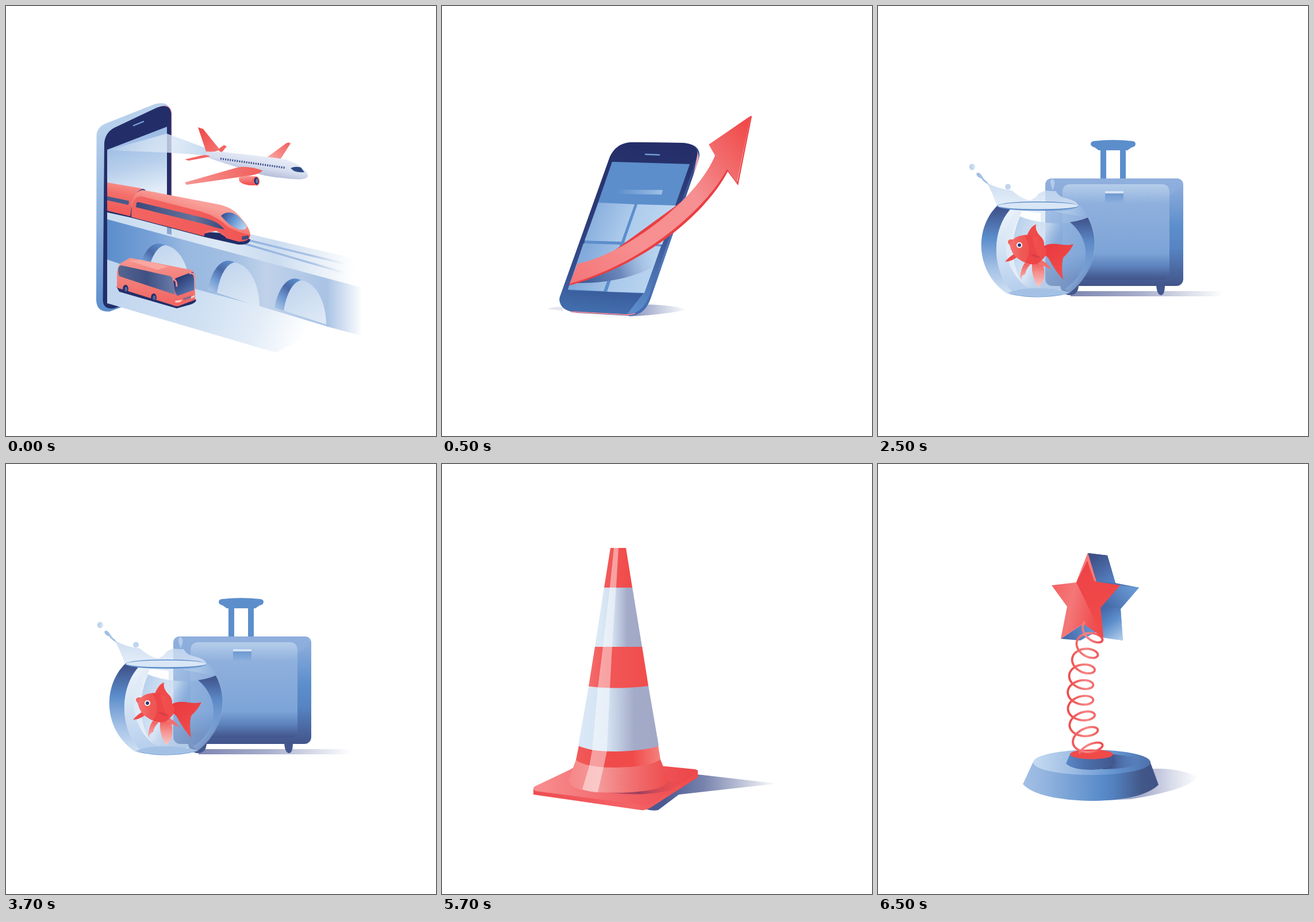
Write an HTML page that moves like this. It is 748 px wide and 748 px high and loops after 8000 ms.

```html
<!DOCTYPE html>
<html lang="en">
<head>
<meta charset="utf-8">
<title>Illustrations</title>
<style>
html, body { margin: 0; width: 100%; height: 100%; overflow: hidden; background: #fff; }
svg { display: block; width: 100%; height: 100%; }
</style>
</head>
<body>
<svg id="stage" viewBox="0 0 748 748" xmlns="http://www.w3.org/2000/svg"></svg>
<script>
const NAVY = '#232e69', BLUE = '#5c8ecc', DEEP = '#42548a', RED = '#f04a49', CORAL = '#f26462', PINK = '#f78f8f';
const defs = [];

// Linear gradient in stage units; a stop is "colour" or "colour offset".
function lin(x1, y1, x2, y2, ...stops) {
  const id = 'g' + defs.length;
  const body = stops.map((s, i) => {
    const [c, o = i / (stops.length - 1)] = s.split(' ');
    return `<stop offset="${o}" stop-color="${c}"/>`;
  }).join('');
  defs.push(`<linearGradient id="${id}" gradientUnits="userSpaceOnUse" x1="${x1}" y1="${y1}" x2="${x2}" y2="${y2}">${body}</linearGradient>`);
  return `url(#${id})`;
}
const path = (d, fill, more = '') => `<path d="${d}" fill="${fill}" ${more}/>`;
const line = (d, stroke, w, more = '') => path(d, 'none', `stroke="${stroke}" stroke-width="${w}" ${more}`);
const oval = (x, y, rx, ry, fill, more = '') => `<ellipse cx="${x}" cy="${y}" rx="${rx}" ry="${ry}" fill="${fill}" ${more}/>`;
const box = (x, y, w, h, r, fill) => `<rect x="${x}" y="${y}" width="${w}" height="${h}" rx="${r}" fill="${fill}"/>`;
const turn = (a, x, y) => `transform="rotate(${a} ${x} ${y})"`;

function travel() {
  const arch = (x, y) => `<g transform="translate(${x} ${y})">` +
    path('M351 494C357 462 371 443 387 443Q396 444 403 449L369 500Z', lin(353, 494, 392, 446, '#a8c3e6', '#6f98d0 .35', '#4a69a8 .65', '#5c8ecc')) +
    path('M367 499C371 475 380 450 397 446C424 449 441 486 441 523Z', lin(385, 450, 425, 520, '#c2d6ee', '#dde8f5')) + '</g>';
  const phone =
    path('M157 512L157.500 224Q159 209 177 203L258 171Q284 163 288 186V400L206 522L180 531.500Q158 533 157 512Z', lin(160, 210, 170, 530, '#b7d0ec', '#8cb2df', BLUE)) +
    path('M270 173Q288.500 171 288.500 188V330H286V186Z', '#f3a9b5') +
    path('M168.500 513L171 238Q173 220 188 212L262 177Q285 168 287.500 187V400L207 520L187 526Q170 528 168.500 513Z', NAVY) +
    path('M176 250L280 210V400L176 518Z', lin(215, 232, 240, 325, '#9dbce4', '#b9d0ec', '#e1ecf8')) +
    line('M222 208L239 201', '#7ba4da', 2.4, 'stroke-linecap="round"') +
    path('M176 251L280 222L350 248L351 260L280 255Z', lin(176, 250, 350, 250, '#ffffff10', '#dfeaf6b8 .5', '#c7dbf1'));
  const dots = line('M373 265.500L486 281.500', '#3b4b87', 3.4, 'stroke-dasharray="2 2.1"');
  const plane =
    path('M453 264L487 239Q492 236 495 239L477 267Z', lin(460, 265, 492, 238, '#f9a39f', CORAL)) +
    path('M368 250L379 242L384 244L375 255Z', CORAL) +
    path('M347 257Q350 252 368 253L397 256L467 264Q496 267 510 278Q527 290 525 297Q520 304 488 300Q447 297 413 284L357 266Q349 263 347 257Z', lin(432, 258, 424, 298, '#e6ebf6', '#d5dcee .45', '#a3adcd')) +
    dots +
    path('M495 282Q504 278 513 281L519 289Q508 290 501 287Z', '#2d4a84') +
    path('M334 211L343 214L372 250Q363 255 348 253Z', lin(335, 215, 363, 252, RED, '#f4706c')) +
    path('M311 267L340 260Q350 258 355 262L318 269Z', CORAL) +
    path('M311 307L402 281Q419 277 446 286Q443 292 424 295L314 311Z', lin(311, 308, 442, 285, '#f69793', '#f25e5b')) +
    path('M405 299Q413 293 438 297Q444 307 435 312Q413 313 406 305Z', lin(420, 295, 421, 312, '#f99a96', RED)) +
    oval(435, 304.5, 6, 8, CORAL, turn(-8, 435, 304)) + oval(435.5, 304.5, 4, 6.3, NAVY, turn(-8, 436, 304)) + oval(436.5, 304.5, 2.2, 4, '#617aac');
  const bridge =
    path('M176 370L620 490V574L560 558L176 449Z', lin(176, 0, 620, 0, '#5c8ecc', '#78a1d7 .18', '#97b8e0 .3', '#a4c0e3 .5', '#c0d2ea .62', '#a9c3e5 .86', '#fff')) +
    arch(-121, -30) + arch(0, 0) + arch(116, 31) +
    path('M176 355L425 397L604 439L620 490L176 371Z', lin(176, 0, 606, 0, '#c7dbf0', '#dce8f5 .45', '#cbdcf0 .68', '#fff')) +
    path('M280 384H288V398L280 396Z', '#87a5d0') +
    line('M420 407L592 449M410 412L588 464', lin(410, 0, 594, 0, '#8eafdb', '#a9c3e5 .65', '#fff'), 3.5);
  const train =
    path('M176 354L221 363L350 393L402 397L425 406Q424 416 404 415L346 402L217 368L176 359Z', NAVY) +
    path('M176 307L229 316Q239 317 239 321Q225 323 219 342L217 366L176 356Z', lin(205, 308, 195, 358, '#f8908a', '#f36e6a .4', '#f15b59')) +
    path('M176 331L214 339L213 346L176 338Z', '#485a8c') +
    path('M216 367L219 346Q222 323 238 318L243 320Q226 330 224 349L220 369Z', NAVY) +
    path('M218 367L219 346Q221 322 238 320L369 345Q395 350 409 369Q425 387 425 399Q424 409 407 409L385 404L366 391L345 396V400Z', lin(300, 332, 285, 382, '#f9a09a', '#f57d77 .5', CORAL)) +
    path('M218 367L220 346Q223 331 235 331L341 358Q368 366 387 385Q407 395 424 398Q425 410 405 410L383 404Q376 390 356 390Q345 389 343 400Z', lin(220, 350, 420, 402, '#f26562', '#f15654')) +
    path('M227 342L230 341L346 369Q370 375 380 389Q362 385 344 379L226 350Z', lin(226, 0, 380, 0, '#39497f', '#667399 .65', '#39497f')) +
    path('M374 365Q382 357 394 360Q407 365 418 382Q421 390 406 389Q388 383 374 365Z', lin(377, 363, 415, 388, '#35539a', '#6d9cd7 .5', '#bdd5f0')) +
    path('M410 401L422 399V405L411 407Z', '#414d83');
  const road = path('M176 441L320 490L441 522L557 557L470 603L176 517Z', lin(190, 460, 515, 588, '#c0d5ee', '#cedff2 .45', '#e2ecf7 .75', '#fff'));
  const wheel = (x, y) => oval(x, y, 4.8, 7, NAVY) + oval(x + .8, y + .5, 2.3, 4, '#56699b');
  const bus =
    path('M192 488L297 518L330 510Q333 515 322 519L297 526L197 497Z', NAVY) +
    path('M193 490V463Q195 450 200 447L216 438L317 458Q327 460 328 467L329 511L300 522Q295 523 289 520Z', lin(225, 440, 225, 520, '#f7958e', '#f27a75 .55', '#f16461')) +
    path('M213 443L233 441L283 453L264 459Z', '#f9a7a0') +
    path('M196 454L200 451L286 470Q290 472 290 478L294 502L197 470Q194 463 196 454Z', lin(196, 0, 294, 0, '#53658f', '#3f5083 .5', '#6a7dab')) +
    path('M291 478Q293 474 299 472L323 463Q327 462 327 468V494L299 504Q293 502 291 478Z', lin(300, 474, 320, 500, '#2c3c75', '#5876af')) +
    path('M294 513L307 511L303 515L295 516ZM320 507L328 503V506L322 509Z', '#ffd3c8') +
    path('M308 508L322 504V508L309 512Z', '#8a6b8c') +
    line('M292 476Q297 477 297 487M320 465Q328 464 328 473', PINK, 2.8, 'stroke-linecap="round"') +
    wheel(208, 492) + wheel(257, 507);
  return phone + plane + bridge + train + road + bus;
}

function growth() {
  const tile = (d, y) => path(d, lin(255, y, 385, y + 50, '#82aadb', '#a9c8ea .5', '#bad5f0'));
  return path('M184 527Q196 522 210 524V530Z', '#e3e5f0') +
    path('M345 519Q393 519 428 528Q385 537 325 540Z', lin(335, 0, 428, 0, '#8d97c0', '#c9cee2 .5', '#ffffff')) +
    path('M297 260Q308 238 334 237L419 238Q455 241 446 269L364 506Q354 538 327 539L236 534Q199 529 206 505Z', lin(400, 260, 290, 530, '#354a8b', '#5079ba .55', '#436aae')) +
    path('M437 246Q449 254 446 269L437 296L443 264Z', '#e7a4b4') +
    line('M225 532L322 537Q330 537 336 534', '#f08792', 2) +
    path('M292 262Q304 237 331 237L417 238Q450 240 443 264L361 502Q350 535 322 536L233 531Q197 524 206 503Z', lin(330, 240, 300, 535, '#252e68', '#2b3b78 .45', '#35508f .78', '#426ead')) +
    path('M443 264L361 502Q350 535 322 536L350 500L431 275Z', lin(430, 280, 340, 530, '#2b397566', '#5b8ccc')) +
    path('M296 271L431 275L352 500L219 494Z', BLUE) +
    line('M354 258L378 259', '#6e9bd5', 2.5, 'stroke-linecap="round"') +
    path('M306 319.500L384 320L382 328L303 327Z', lin(303, 0, 384, 0, '#5c8ecc', '#9fc0e7')) +
    tile('M272 342L335 345L312 410L248 408Z', 342) +
    tile('M340 345L407 347L383 415L317 411Z', 320) +
    tile('M246 413L310 415L281 496L219 493Z', 413) +
    tile('M315 415L381 418L352 499L287 497Z', 390) +
    path('M232 482Q305 457 371 421L367 454Q312 483 232 482Z', lin(242, 480, 372, 430, '#3d5794', '#6b88bc .5', '#afcae900')) +
    path('M221 486L223 481L497 282L514 306L537 191L539 192L515 312L497 288C455 368 342 455 221 486Z', '#e93f43') +
    path('M236 448C320 432 445 335 475 260L464 241L537 191L513 308L496 284C452 363 340 451 222 483Z', lin(225, 470, 535, 210, '#f4777a', '#f78f90 .3', '#f69092 .63', '#f26b6c .82', RED));
}

function escape() {
  const shell = lin(0, 300, 0, 487, '#94b2de', '#5c8ecc .45', '#5784c3 .65', DEEP);
  const fin = lin(0, 440, 0, 490, RED, '#f5928f', '#f9c9ca');
  const luggage =
    box(335, 496, 266, 9, 0, lin(335, 0, 601, 0, '#7d86b0', '#a7aecb .45', '#fff')) +
    box(387, 248, 10, 56, 0, BLUE) + box(421, 248, 10, 56, 0, BLUE) +
    path('M375 235Q409 231 443 235Q448 236 448 240Q448 245 441 246L434 251H384L377 246Q370 244 370 240Q370 236 375 235Z', BLUE) +
    path('M317 485H349Q349 503 332 503Q317 500 317 485ZM484 485H499Q499 503 492 503Q485 502 484 485Z', '#43578f') +
    box(291, 300, 240, 187, 12, shell) +
    path('M303 300H519Q531 300 531 312L507 330V320Q506 310 494 310H335Q321 311 321 324V476L291 475V312Q291 300 303 300Z', lin(0, 300, 0, 476, '#8fafdd', '#7ba2d700')) +
    path('M335 310H493Q507 310 507 324V462Q507 476 493 476H335Q321 476 321 462V324Q321 310 335 310Z', lin(0, 310, 0, 476, '#b5cdea', '#8fb0dd .2', '#7da4d7 .72', '#5d82bd .86', DEEP)) +
    box(395, 322, 32, 20, 0, lin(0, 326, 0, 342, '#7099d1', '#8bafdd')) + box(395, 322, 32, 4, 0, '#d6e5f5');
  const splash = lin(0, 305, 0, 348, '#c0d4edd0', '#dce8f6c0');
  const bowl =
    path('M190 308Q210 318 233 321Q249 335 263 338Q273 336 279 327Q290 319 300 322H309Q315 333 329 335Q344 338 350 348H207Q199 325 190 308Z', splash) +
    path('M171 292Q174 287 179 293L185 302Q190 305 193 311Q182 305 180 300Q172 298 171 292Z', '#a2bfe4') +
    oval(164, 280, 5, 5.5, lin(159, 0, 169, 0, '#b3cbea', '#dce7f5')) + oval(226, 314.5, 5, 5, '#c0d5ee') +
    path('M300 309Q299 300 304 301Q309 304 307 311L304 321Z', '#bfd3ecc0') +
    path('M208 347C169 384 167 460 224 500Q278 513 332 500C391 456 389 381 350 347Z', lin(180, 0, 378, 0, '#cbddf1', '#e4edf8 .3', '#c7daf080 .56', '#8fb1de50')) +
    path('M208 347C169 384 167 460 224 500L236 500C196 461 198 390 230 354Z', lin(0, 350, 0, 500, '#3e5088', '#5c8ecc .36', '#a3c0e5 .7', '#cfe0f3')) +
    path('M230 354C198 390 196 461 236 500L263 492C215 458 211 397 241 355Z', lin(210, 370, 240, 490, '#e8f0f9', '#b8d0ed')) +
    path('M230 354H251L246 367C225 405 238 470 268 492H283V360Z', lin(0, 355, 0, 490, '#ffffff', '#f2f6fc80')) +
    path('M247 366Q279 379 323 378Q350 377 365 369C389 413 368 465 331 493H260C228 458 230 402 247 366Z', lin(240, 380, 375, 440, '#a9c6e8d0', '#cfe0f2b0 .35', '#82a8d970 .52', '#79a1d680')) +
    path('M334 376Q350 374 365 368C390 416 372 468 333 499L324 493C373 460 371 407 334 376Z', lin(0, 368, 0, 495, '#3e5088', '#5b87c4 .32', '#6f9ad1c0 .6', '#8fb2de80')) +
    path('M306 357Q339 358 350 347Q360 355 365 368Q338 364 306 357Z', lin(306, 0, 365, 0, '#c9dcf080', '#8cafdd')) +
    oval(278, 348, 71, 8, '#5d8ecc') + oval(278.5, 347.5, 70, 6, '#d9e6f5') +
    path('M224 500Q278 513 332 500Q278 508 224 500Z', BLUE) +
    path('M226 499Q242 491 279 491Q321 492 333 499Q310 505 279 506Q243 505 226 499Z', '#a4c1e5');
  const fish =
    path('M265 450Q257 458 256 466Q250 468 248 476Q246 462 255 447Z', fin) +
    path('M268 449Q266 468 278 489Q291 481 289 458L285 444Z', fin) +
    path('M277 440Q294 444 302 459Q292 452 280 451Z', '#f36e6d') +
    path('M245 434Q233 445 221 445Q228 436 239 430Z', RED) +
    path('M258 402Q265 383 275 380Q272 390 283 401Q290 407 289 418L265 412Z', RED) +
    path('M286 419Q298 411 318 415Q333 417 340 414Q335 426 322 438Q318 453 322 476Q310 463 299 443Q294 433 284 431Z', lin(288, 418, 325, 460, '#e8393f', RED)) +
    path('M229 406Q225 411 229 416Q233 434 246 441Q267 456 285 442Q298 430 290 418Q280 400 262 398Q243 398 235 406Z', lin(230, 422, 290, 420, '#f57472', '#ef5855 .35', RED)) +
    path('M254 399Q270 420 256 447Q275 454 285 442Q269 423 269 398Z', '#ee4548') +
    path('M264 431Q275 431 283 438Q270 439 264 431Z', '#d93d49') +
    path('M226 409Q228 405 234 407L231 415Q225 414 226 409Z', '#f36563') +
    oval(246, 416, 5, 5, '#fff') + oval(246, 416, 3, 3, '#2d3972');
  return luggage + bowl + fish;
}

function cone() {
  const red = lin(255, 0, 378, 0, '#f46d6b', '#f25758 .25', RED);
  const grey = lin(248, 0, 368, 0, '#d9e8f6', '#d2e0f0 .35', '#a3abc8 .72', '#a2a9c7');
  return path('M445 540L583 556L412 575L376 602Q368 604 356 601L400 550Z', lin(385, 0, 583, 0, '#4b5991', '#7782ad .35', '#fff')) +
    path('M159 564V575L346 602Q355 603 364 597L445 545V535L352 592Z', lin(160, 0, 445, 0, '#ef4c50', '#f36367 .6', RED)) +
    path('M161 561L222 532Q228 527 245 525H380L440 531Q449 533 443 538L365 590Q358 594 349 593L163 569Q156 566 161 561Z', lin(175, 560, 430, 540, '#f78b8c', '#f26064 .58', '#ed484c')) +
    path('M246 564Q310 573 390 552L421 552L396 568Q330 583 246 564Z', lin(250, 0, 420, 0, '#af405b00', '#9c405d .55', '#e9464c00')) +
    path('M233 515L220 550Q221 566 268 571Q335 574 373 565Q394 558 393 548L380 514Z', lin(221, 0, 393, 0, '#f68787', '#f49b9a .3', '#f17475 .6', '#ee4d4e')) +
    path('M238 490L233 515Q252 529 306 528Q364 526 380 514L376 490Z', lin(235, 0, 380, 0, '#f15a5a', '#ef4c4c .3', RED, '#f4827f')) +
    path('M255 388L237 490Q260 501 306 500Q358 498 377 490L359 386Z', grey) +
    path('M266 318L255 387Q305 393 359 386L348 317Z', red) +
    path('M282 214L266 318H348L331 214Z', lin(276, 0, 340, 0, '#dbe9f6', '#d0dded .35', '#a3abc8 .72', '#a2a9c7')) +
    path('M293 146L282 215H331L320 146Z', lin(285, 0, 327, 0, '#f25a59', RED)) +
    path('M299 146H307L303 214L296 318L292 390L287 499L281 528L271 571Q256 570 244 566L256 526L261 499L271 390L280 318L292 214Z', '#ffffff', 'opacity=".45"');
}

function spring() {
  let d = '';
  // A trochoid along a bent spine; u counts the turns.
  for (let u = -.58; u <= 7.42; u += .02) {
    const a = u * 2 * Math.PI, r = 20 + u * .55;
    const dx = r * Math.cos(a);
    const x = 352 + 1.35 * (u - 3.7) ** 2 + dx;
    const y = 305 + 26.4 * u - 13.7 * Math.sin(a) + (.2 - .055 * u) * (dx - r);
    d += (d ? 'L' : 'M') + x.toFixed(1) + ' ' + y.toFixed(1);
  }
  return line(d, lin(332, 0, 388, 0, '#ee4d4d', '#f3696a .3', '#f68788 .55', '#ef4e50'), 3.8, 'stroke-linejoin="round"');
}

function trophy() {
  const base =
    path('M465 531Q520 526 557 545Q535 568 440 583L375 586Z', lin(455, 0, 557, 0, '#a3aacb', '#d9dcea .55', '#fff')) +
    path('M270 518L252 557Q278 584 372 586Q460 585 488 558L473 517Z', lin(253, 0, 488, 0, '#a2c0e5', '#94b5df .15', '#5c8ecc .55', '#5380bf .67', '#425788 .88', '#3f5287')) +
    oval(372, 519, 102, 22, lin(270, 510, 474, 525, '#c6dbf1', '#a0bfe5 .32', '#6596d1 .68', '#4c70ad')) +
    path('M409 505Q450 508 454 519Q446 530 390 531Z', lin(405, 0, 455, 0, '#3f548b', '#4c70ad00')) +
    path('M334 505L327 521Q338 532 371 532Q403 531 413 521L409 505Z', lin(327, 0, 413, 0, '#5b89c7', '#4d71ae .35', '#41568c')) +
    oval(371.5, 505, 37.5, 8.5, RED);
  const star =
    path('M365 155L399 159L413 207L454 215L422 252L426 307L391 302L380 250Z', lin(405, 165, 420, 305, '#3e5188', '#4d70ad .3', '#5c8ecc .62', '#608fcd .8', '#aac6e9')) +
    path('M365 155L399 159L413 207L380 205Z', lin(370, 165, 400, 208, '#3e5188', '#5580c1')) +
    path('M421 211L454 215L422 252L387 250Z', lin(440, 215, 400, 250, '#6798d3', '#466aa9')) +
    path('M387 250L422 252L426 307L392 302Z', lin(388, 253, 425, 305, '#4467a6', '#5c8ecc .45', '#b4cdeb')) +
    path('M318 304L357 278L380 292L352 307Z', lin(320, 303, 378, 290, '#4065a8', '#6b99d3')) +
    path('M365 155L380 205L421 211L387 250L392 302L357 278L318 304L329 248L302 211L345 206Z', lin(305, 225, 400, 245, '#f56464', '#f47778 .35', '#f05051 .8', RED)) +
    path('M365 155L380 205L421 211L387 250L392 302L345 206Z', lin(350, 200, 400, 270, '#ee4448', RED)) +
    path('M365 155L380 205L376 203L364 168L345 206Z', '#f67c7c');
  return base + star + spring();
}

const scenes = [travel, growth, escape, cone, trophy];
const starts = [0, 500, 2500, 4500, 6500];
const LOOP = 8000;
const stage = document.getElementById('stage');
const art = scenes.map(draw => `<g class="scene" display="none">${draw()}</g>`).join('');
stage.innerHTML = `<defs>${defs.join('')}</defs>${art}`;
const groups = stage.querySelectorAll('.scene');
let shown = -1;

function update() {
  const t = performance.now() % LOOP;
  const now = starts.filter(s => s <= t).length - 1;
  if (now !== shown) {
    groups.forEach((g, i) => g.setAttribute('display', i === now ? 'inline' : 'none'));
    shown = now;
  }
  requestAnimationFrame(update);
}
update();
</script>
</body>
</html>
```
